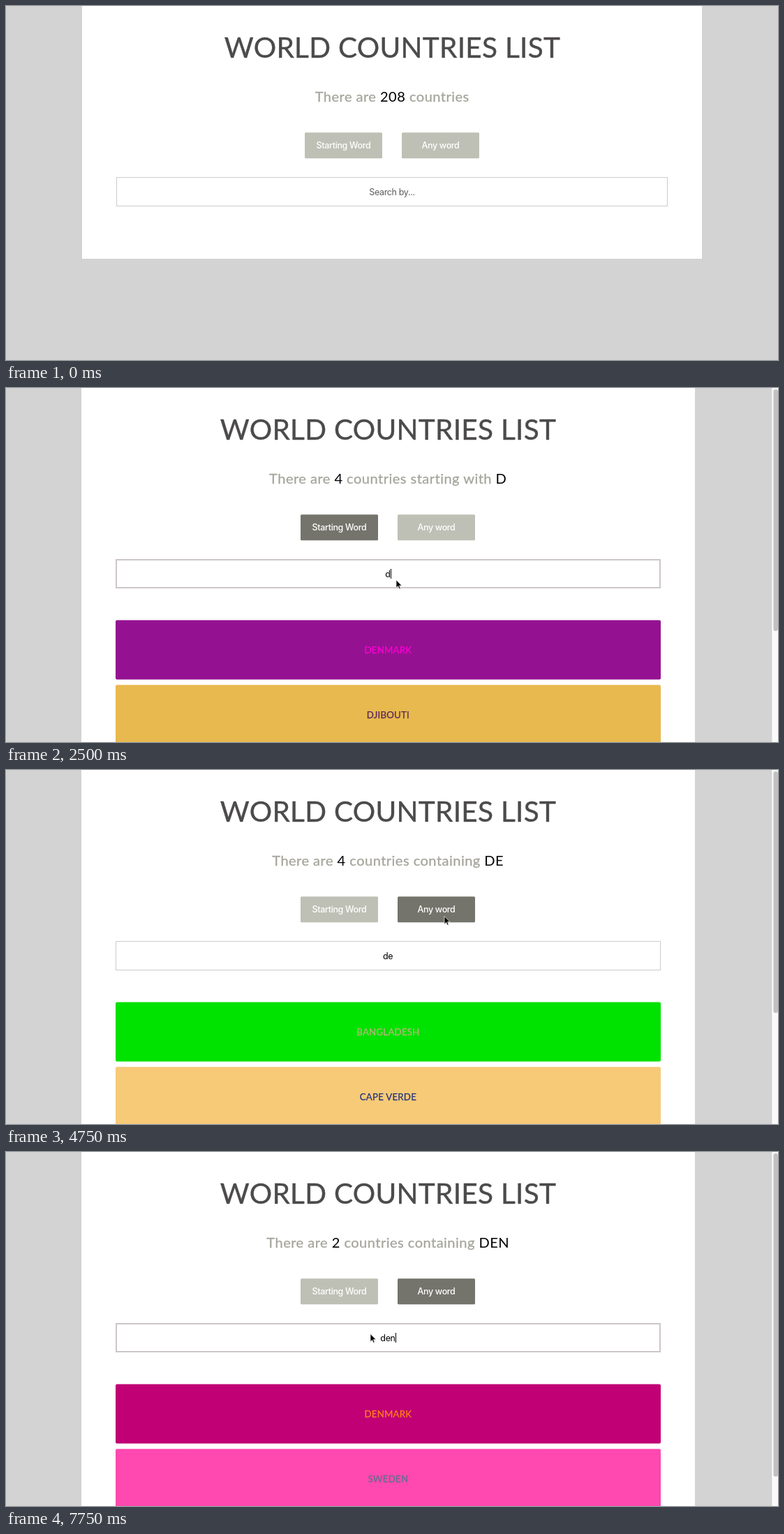
Animation, 1106 px wide and 507 px high, one loop 8 s. Source, as an HTML page:

```html
<!DOCTYPE html>
<html lang="en">
<head>
<meta charset="utf-8">
<title>World countries list</title>
<style>
  html, body { margin: 0; width: 100%; height: 100%; overflow: hidden; background: #d3d3d3; }
  svg { display: block; width: 1106px; height: 507px; }
  text { font-family: Lato, sans-serif; text-anchor: middle; white-space: pre; }
  #title { font-size: 40.5px; letter-spacing: .3px; fill: #4c4a4a; stroke: #4c4a4a; stroke-width: .4px; }
  #count { font-size: 20.1px; letter-spacing: .45px; fill: #a6a59c; stroke: #a6a59c; stroke-width: .3px; }
  #count .key { fill: #000; stroke: none; }
  .button text, #query { font-family: Inter, sans-serif; font-size: 12.5px; letter-spacing: -.35px; }
  .button text { font-weight: 500; }
  .card text { font-size: 13.3px; letter-spacing: .2px; stroke-width: .25px; }
</style>
</head>
<body>
<svg viewBox="0 0 1106 507">
  <rect id="panel" fill="#fff"/>
  <text id="title" y="73.5">WORLD COUNTRIES LIST</text>
  <text id="count" y="136.5"><tspan></tspan><tspan class="key"></tspan><tspan></tspan><tspan class="key"></tspan></text>
  <g class="button"><rect y="181.2" width="111" height="37" rx="1.5"/><text y="204">Starting Word</text></g>
  <g class="button"><rect y="181.2" width="111" height="37" rx="1.5"/><text y="204">Any word</text></g>
  <rect id="field" fill="#fff"/>
  <text id="query" y="271"></text>
  <rect id="caret" y="259" width="1" height="14"/>
  <g class="card"><rect y="332.5" height="85" rx="2"/><text y="380.3"></text></g>
  <g class="card"><rect y="425.2" height="85" rx="2"/><text y="472.8"></text></g>
  <g id="scroll">
    <rect x="1097" width="9" height="507" fill="#fafafa"/>
    <rect x="1097" width="1" height="507" fill="#ececec"/>
    <rect id="thumb" x="1099.5" y="2" width="6.5" rx="3.2" fill="#c1c1c1"/>
  </g>
  <g id="cursor">
    <path d="M.5 1.2V12L3 9.8 4.8 13.6 6.6 12.8 5 9H8.6Z" fill="#000" opacity=".22"/>
    <path d="M0 0V11L2.6 8.7 4.3 12.6 6.1 11.9 4.5 8.1H8Z" stroke="#fff" stroke-width=".7"/>
  </g>
</svg>
<script>
const LOOP = 8000;

// Each step overrides part of the state from its time on.
const steps = [
  [0, {
    bottom: 362, thumb: 0, mode: -1, hover: -1, focus: false, caret: 0, cursor: null,
    query: '', count: ['There are ', '208', ' countries', ''], cards: []
  }],
  [250, { cursor: [667, 300.5] }],
  [500, { cursor: [632, 296.7] }],
  [750, { cursor: [632.5, 297] }],
  [1000, { cursor: [559, 275], focus: true }],
  [1500, { caret: 553 }],
  [2000, { caret: 0 }],
  [2500, {
    bottom: 507, thumb: 348, mode: 0, caret: 551, query: 'd',
    count: ['There are ', '4', ' countries starting with ', 'D'],
    cards: [['DENMARK', '#941291', '#fb00d2'], ['DJIBOUTI', '#e8b94e', '#5b2a57']]
  }],
  [3000, {
    bottom: 462, thumb: 0, caret: 559, query: 'de',
    count: ['There is ', '1', ' country starting with ', 'DE'],
    cards: [['DENMARK', '#51078c', '#ffa9d8']]
  }],
  [3500, { caret: 0 }],
  [4000, { caret: 559, focus: false, cursor: [636, 222] }],
  [4250, { hover: 1, cursor: [628, 209.5] }],
  [4500, { caret: 0 }],
  [4750, {
    bottom: 507, thumb: 348, mode: 1, hover: -1,
    count: ['There are ', '4', ' countries containing ', 'DE'],
    cards: [['BANGLADESH', '#00e200', '#b5b878'], ['CAPE VERDE', '#f6ca77', '#27357f']]
  }],
  [5250, { focus: true, cursor: [609.5, 268] }],
  [5500, { cursor: [611, 269.5] }],
  [5750, { caret: 554, cursor: [612, 270] }],
  [6250, { caret: 0 }],
  [6750, {
    thumb: 465, caret: 558, query: 'den',
    count: ['There are ', '2', ' countries containing ', 'DEN'],
    cards: [['DENMARK', '#b04a72', '#f0d25a'], ['SWEDEN', '#d0789a', '#3a4c80']]
  }],
  [7250, { caret: 0 }],
  [7500, {
    caret: 558,
    cards: [['DENMARK', '#c00074', '#ff7f1c'], ['SWEDEN', '#ff48b0', '#61708c']]
  }],
  [7750, { cursor: [522, 260.5] }]
];

const $ = id => document.getElementById(id);
const all = selector => [...document.querySelectorAll(selector)];
const parts = all('#count tspan'), buttons = all('.button'), cards = all('.card');

function set(el, attrs) {
  for (const name in attrs) el.setAttribute(name, attrs[name]);
}

function show(el, visible) {
  el.style.display = visible ? '' : 'none';
}

function draw(s) {
  const narrow = s.thumb > 0;
  const mid = narrow ? 547 : 553;
  const left = narrow ? 157 : 158;
  const width = narrow ? 781 : 790;

  set($('panel'), { x: narrow ? 108 : 109, y: 0, width: narrow ? 879 : 888, height: s.bottom });
  set($('title'), { x: mid + .5 });
  set($('count'), { x: mid + .2 });
  parts.forEach((part, i) => part.textContent = s.count[i]);

  buttons.forEach((button, i) => {
    const [box, label] = button.children;
    const x = mid + (i ? 14 : -125);
    set(box, { x, fill: s.mode === i ? '#74746c' : '#bfc0b5' });
    set(label, { x: x + 55.5, fill: s.hover === i ? '#e9e9e4' : '#fff' });
  });

  const line = s.focus ? 2 : 1;
  set($('field'), {
    x: left + line / 2, y: 245 + line / 2, width: width - line, height: 42 - line,
    stroke: s.focus ? '#cdc6c7' : '#cccccc', 'stroke-width': line
  });
  $('query').textContent = s.query || 'Search by...';
  set($('query'), { x: mid, fill: s.query ? '#000' : '#5e5a5a' });
  show($('caret'), s.caret);
  set($('caret'), { x: s.caret });

  cards.forEach((card, i) => {
    show(card, s.cards[i]);
    if (!s.cards[i]) return;
    const [name, back, ink] = s.cards[i];
    const [box, label] = card.children;
    set(box, { x: left, width, fill: back });
    set(label, { x: mid + .4, fill: ink, stroke: ink });
    label.textContent = name;
  });

  show($('scroll'), narrow);
  set($('thumb'), { height: Math.max(0, s.thumb - 2) });
  show($('cursor'), s.cursor);
  if (s.cursor) set($('cursor'), { transform: `translate(${s.cursor})` });
}

const start = performance.now();
let last = 0;

function frame() {
  const t = Math.max(0, performance.now() - start) % LOOP;
  const past = steps.filter(([time]) => time <= t);
  if (past.length !== last) {
    last = past.length;
    draw(Object.assign({}, ...past.map(step => step[1])));
  }
  requestAnimationFrame(frame);
}
frame();
</script>
</body>
</html>
```
